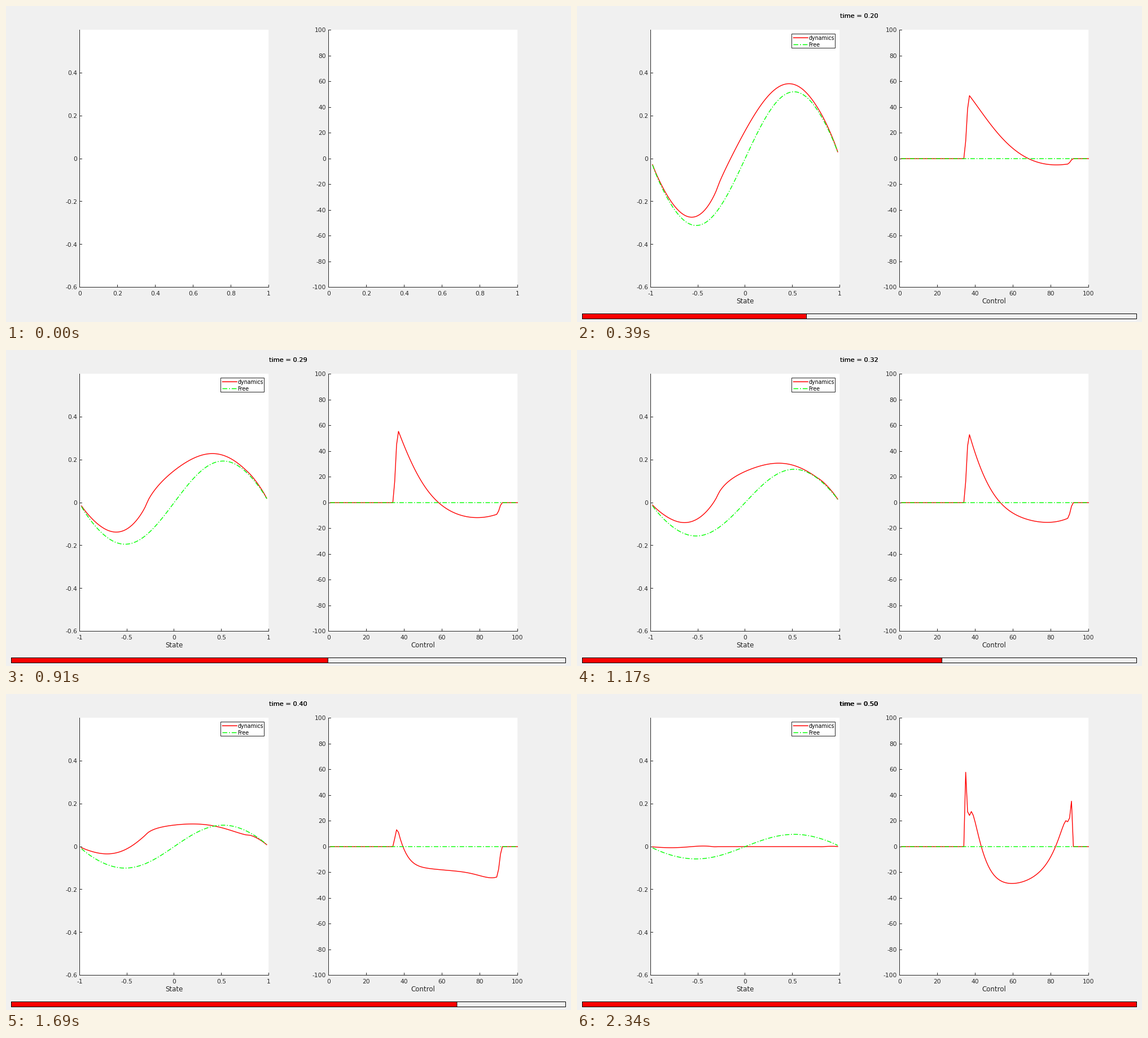
Recreate the animation shown at these times as a matplotlib script. Size 1001 by 559 pixels, loop 3770 ms.

```python
import numpy as np
import matplotlib.pyplot as plt
from matplotlib.animation import FuncAnimation
from matplotlib.patches import Rectangle

W, H, DPI = 1001, 559, 64
PX = 72 / DPI                      # points per pixel
FRAMES, INTERVAL = 29, 130
INK, RED, GREEN = "#262626", "#ff0000", "#00ff00"
DASHDOT = (0, (5.7, 2, 1.2, 2))
LEFT, RIGHT = 130.5, 571.5         # left edges of the two panels
TOP, BOTTOM, PANEL_W = 42.5, 497.5, 334.7
MIDDLE = (TOP + BOTTOM) / 2
BAR_L, BAR_R, BAR_T, BAR_H = 9.5, 991.5, 544.5, 9

plt.rcParams["font.family"] = "DejaVu Sans"
plt.rcParams["path.snap"] = False

# Fractional heat equation on (-1, 1), started from sin(pi x)
N, ALPHA, END, DT = 100, 1.6, 0.5, 0.005
STEP = 2 / (N + 1)
CELLS = np.arange(1, N + 1)
X = -1 + STEP * CELLS
weights = 1.648 * np.cumprod(np.r_[1, 1 - (ALPHA + 1) / (ALPHA / 2 + CELLS[:-1])])
lam, modes = np.linalg.eigh(weights[abs(CELLS[:, None] - CELLS)] / STEP ** ALPHA)
lam = np.log1p(lam * DT) / DT      # decay rates of implicit time steps
start = modes.T @ np.sin(np.pi * X)

# Least-norm control that steers the state to zero from inside the active zone
PENALTY = 8e-5
zone = np.clip(np.minimum(CELLS - 34.48, 91.52 - CELLS) / 2, 0, 1)
coupling = modes.T @ (zone[:, None] ** 2 * modes)
rates = lam[:, None] + lam


def response(t):
    return coupling * -np.expm1(-rates * t) / rates


adjoint = np.linalg.solve(response(END) + PENALTY * np.eye(N), np.exp(-lam * END) * start)


def adjoint_at(t):
    return np.exp(-lam * (END - t)) * adjoint


def free_state(t):
    return modes @ (np.exp(-lam * t) * start)


def controlled_state(t):
    return free_state(t) - modes @ (response(t) @ adjoint_at(t))


def control(t):
    return -zone * (modes @ adjoint_at(t))


CONTROL_GAIN = 53.5 / control(0.247).max()


def progress(frame):
    return np.interp(frame, [1, 5, 15, 18], [0.315, 0.4935, 0.8815, 1])


# Stage in pixel coordinates
fig = plt.figure(figsize=(W / DPI, H / DPI), dpi=DPI, facecolor="#f0f0f0")
ax = fig.add_axes([0, 0, 1, 1])
ax.set_xlim(0, W)
ax.set_ylim(H, 0)
ax.axis("off")


def line(x, y, color=INK, width=1.0, z=3, **kw):
    return ax.plot(x, y, color=color, lw=width * PX, zorder=z, **kw)[0]


def text(x, y, s, size, ha="center", color=INK):
    return ax.text(x, y + 0.365 * size, s, fontsize=size * PX, ha=ha,
                   va="baseline", color=color, zorder=6)


def box(x, y, w, h, face, edge="none", z=1):
    return ax.add_patch(Rectangle((x, y), w, h, facecolor=face, edgecolor=edge,
                                  lw=PX, zorder=z))


def crisp(v):
    """Centre of the pixel that holds v."""
    return np.floor(v) + 0.5


def label(v):
    return f"{round(v, 1) + 0:g}"


def to_px(values, limit):
    return MIDDLE - values / limit * (BOTTOM - TOP) / 2


def x_ticks(left, values):
    """Evenly spread ticks along the bottom of a panel."""
    made = []
    for x, v in zip(np.linspace(left, left + PANEL_W, len(values)), values):
        made.append(line([crisp(x)] * 2, [BOTTOM, BOTTOM - 4.5], solid_capstyle="butt"))
        made.append(text(x, 508, label(v), 10.6))
    return made


def panel(left, values, limit):
    box(left, TOP - .5, PANEL_W, BOTTOM - TOP + .5, "white")
    line([left, left], [TOP, BOTTOM])
    line([left, left + PANEL_W], [BOTTOM, BOTTOM])
    for v in values:
        y = to_px(v, limit)
        line([left, left + 4.5], [crisp(y)] * 2, solid_capstyle="butt")
        text(left - 4.3, y, label(v), 10.6, "right")


panel(LEFT, np.arange(-3, 3) * 0.2, 0.6)
panel(RIGHT, np.arange(-100, 101, 20), 100)

unit = np.linspace(0, 1, 6)
idle = x_ticks(LEFT, unit) + x_ticks(RIGHT, unit)
running = x_ticks(LEFT, np.linspace(-1, 1, 5)) + x_ticks(RIGHT, unit * 100)
running += [text(LEFT + PANEL_W / 2, 521.8, "State", 11.7),
            text(RIGHT + PANEL_W / 2, 521.8, "Control", 11.7)]

# Legend
running.append(box(380.5, 49.5, 77, 25, "white", INK, 4))
for y, name, color, style in ((56.2, "dynamics", RED, "-"), (68.4, "Free", GREEN, DASHDOT)):
    running.append(line([383.5, 409], [y, y], color, 1.5, 5, ls=style))
    running.append(text(410.5, y + .3, name, 9.5, "left", "black"))

# Curves
state_px = LEFT + (X + 1) / 2 * PANEL_W
control_px = RIGHT + CELLS / 100 * PANEL_W
state_red = line([], [], RED, 1.4, 4)
state_green = line([], [], GREEN, 1.4, 5, ls=DASHDOT)
control_red = line([], [], RED, 1.4, 4)
control_green = line(control_px, np.full(N, MIDDLE), GREEN, 1.4, 5, ls=DASHDOT)
running += [state_red, state_green, control_red, control_green]

# Title, struck twice for its heavier weight, and progress bar
titles = [text(499.7 + dx, 16.4, "", 11.4, color="black") for dx in (-.3, .3)]
bar_frame = box(BAR_L, BAR_T, BAR_R - BAR_L, BAR_H, "none", "black", 3)
bar = box(BAR_L, BAR_T, 0, BAR_H, RED, "black", 4)
running += titles + [bar_frame, bar]


def update(frame):
    for artist in idle:
        artist.set_visible(frame == 0)
    for artist in running:
        artist.set_visible(frame > 0)
    done = progress(frame)
    t = done * END
    state_red.set_data(state_px, to_px(controlled_state(t), 0.6))
    state_green.set_data(state_px, to_px(free_state(t), 0.6))
    control_red.set_data(control_px, to_px(CONTROL_GAIN * control(t), 100))
    bar.set_width(done * (BAR_R - BAR_L))
    for title in titles:
        title.set_text(f"time = {t:.2f}")
    return []


anim = FuncAnimation(fig, update, frames=FRAMES, interval=INTERVAL,
                     repeat=True, repeat_delay=0)
plt.show()
```
